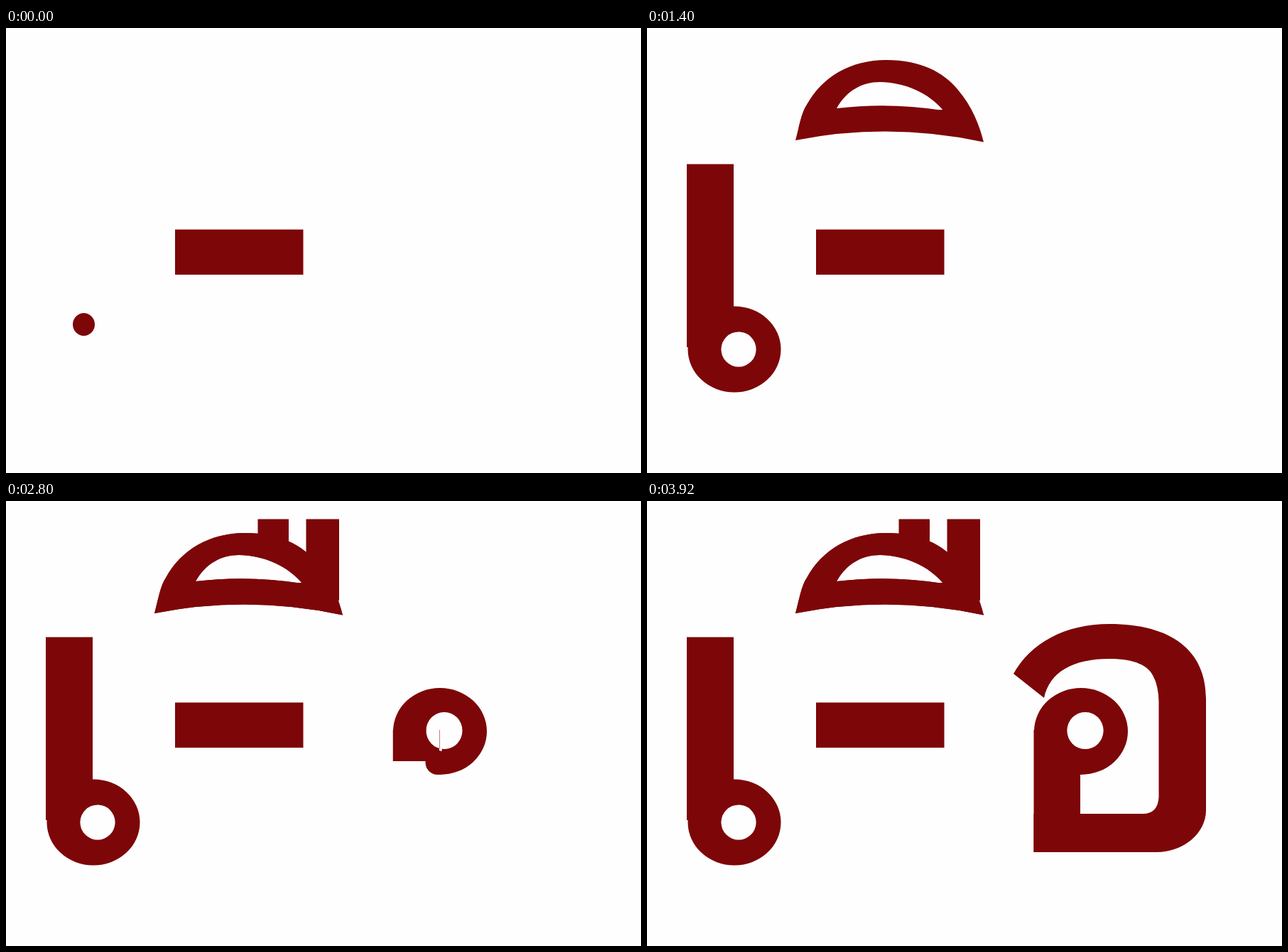
An HTML page with a canvas that plays this animation: 894x626 px, repeating every 4200 ms.

```html
<!DOCTYPE html>
<html lang="th">
<head>
<meta charset="utf-8">
<title>Stroke order</title>
<style>
html, body { margin: 0; width: 100%; height: 100%; overflow: hidden; background: #fefefe; }
canvas { display: block; }
</style>
</head>
<body>
<canvas id="stage" width="894" height="626"></canvas>
<script>
const ctx = document.getElementById('stage').getContext('2d');
const TICK = 70, LOOP = 4200;
const INK = '#7d0608', PAPER = '#fefefe';

const ellipse = (cx, cy, rx, ry) =>
  `M${cx - rx} ${cy}a${rx} ${ry} 0 1 1 ${2 * rx} 0a${rx} ${ry} 0 1 1 ${-2 * rx} 0Z`;
const rect = (x, y, x2, y2) => `M${x} ${y}H${x2}V${y2}H${x}Z`;

// Fills a shape at once, starting at a tick.
const stamp = (from, d) => ({ from, shape: new Path2D(d) });

// Reveals a shape along a guide line; lens holds the drawn length per tick.
const pen = (from, d, guide, width, lens) =>
  ({ from, shape: new Path2D(d), guide: new Path2D(guide), width, lens });

// Reveals a shape by a turning sector; sweeps are in degrees.
function fan(from, d, cx, cy, radius, start, ccw, sweeps) {
  const r = radius / 2, rad = Math.PI / 180, a = start * rad;
  const guide = new Path2D();
  guide.arc(cx, cy, r, a, a + (ccw ? -1 : 1) * 2 * Math.PI, ccw);
  return { from, shape: new Path2D(d), guide, width: radius, lens: sweeps.map(s => s * rad * r) };
}

const hole1 = ellipse(129, 452, 24.5, 24.5);
const hole2 = ellipse(617, 323, 25.5, 26);
const ring1 = ellipse(123, 452, 65.5, 60.5) + hole1;
const ring2 = ellipse(611, 324, 66, 61) + hole2;
const arch = 'M209 158C214 140 217 120 225 108C247 68 287 45 337 45C385 45 417 62 437 86' +
  'C458 110 468 137 474 160.500Q341 132 209 158Z' +
  'M267 113C281 88 303 76 328 76C362 76 398 92 417 116Q341 104 267 113Z';
const hook = 'M544.500 494H717C756 494 787 467 787 435V278C787 210 738 173 651 173' +
  'C588 173 540 200 516 243L559 277C567 240 600 222 651 222C688 222 706 232 713 247' +
  'Q720 260 720.500 282V417Q719 440 698 440H544.500Z';

const strokes = [
  stamp(0, rect(238, 283.5, 418.5, 347)),

  // left vowel
  stamp(0, ellipse(109.5, 417, 15.5, 16)),
  stamp(1, 'M96 408Q104 398 122 392L129 428Q118 428 114 432Z'),
  fan(1, ring1, 129, 441, 82, -99, false, [46, 91, 137, 183, 228, 274, 274, 360]),
  pen(7, rect(56, 191.5, 122, 449) + hole1, 'M89 449V190', 66, [44, 85, 128, 171, 215, 259]),

  // upper vowel
  stamp(14, ellipse(417, 132, 17, 17)),
  stamp(15, 'M400.500 148.500V122Q400 115 408 115L422 115V151Z'),
  pen(15, arch, 'M480 143Q340 114 205 143', 42, [66, 130, 177, 224, 270, 290]),
  fan(20, arch, 337, 140, 150, 180, false, [18, 36, 64, 92, 121, 150, 182]),
  pen(27, rect(422.5, 25.5, 469, 140), 'M445 140V25', 50, [35, 65, 92, 115]),
  pen(31, rect(354.5, 25.5, 398, 62), 'M376 62V25', 48, [22, 30, 37]),

  // right consonant
  stamp(34, ellipse(607.5, 368, 17, 17)),
  fan(35, ring2, 617, 323, 80, 97, true, [50, 100, 150, 200, 250, 277, 360]),
  pen(40, rect(544.5, 322, 610, 494) + hole2, 'M577.500 322V495', 66, [44, 78, 113, 148, 173]),
  pen(44, hook, 'M544 467H712A42 42 0 0 0 754 425V280C754 220 715 197 651 197C595 197 555 225 526 275',
    76, [70, 107, 154, 201, 247, 297, 347, 397, 447, 497, 552, 607, 720])
];

function draw(tick) {
  ctx.fillStyle = PAPER;
  ctx.fillRect(0, 0, 894, 626);
  ctx.fillStyle = ctx.strokeStyle = INK;
  for (const s of strokes) {
    if (tick < s.from) continue;
    if (!s.guide) {
      ctx.fill(s.shape);
      continue;
    }
    const last = s.lens.length - 1, i = tick - s.from;
    if (i >= last) {
      ctx.fill(s.shape, 'evenodd');
      if (s.shape !== s.guide) cleanHole(s);
      continue;
    }
    reveal(s, s.lens[i]);
  }
}

function reveal(s, len) {
  ctx.save();
  ctx.clip(s.shape, 'evenodd');
  ctx.lineWidth = s.width;
  ctx.setLineDash([len, 9999]);
  ctx.stroke(s.guide);
  ctx.restore();
}

// Keeps the counters open where a stem crosses them.
function cleanHole(s) {
  if (!s.counter) return;
  ctx.fillStyle = PAPER;
  ctx.fill(s.counter);
  ctx.fillStyle = INK;
}
strokes.forEach((s, i) => {
  if (i === 4) s.counter = new Path2D(hole1);
  if (i === 13) s.counter = new Path2D(hole2);
});

const began = performance.now();
function frame() {
  draw(Math.floor((performance.now() - began) % LOOP / TICK));
  requestAnimationFrame(frame);
}
frame();
</script>
</body>
</html>
```
